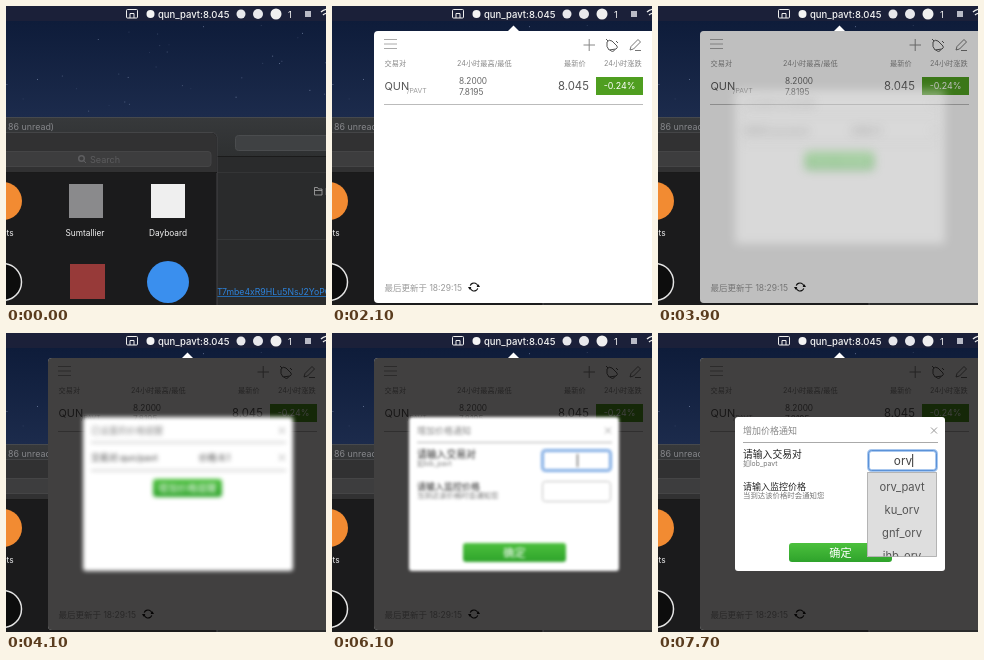
Write an HTML page with a canvas that moves like this. It is 320 px wide and 299 px high and loops after 8 s.

```html
<!DOCTYPE html>
<html lang="zh">
<head>
<meta charset="utf-8">
<title>Price alerts</title>
<style>
html, body { margin: 0; width: 100%; height: 100%; overflow: hidden; background: #1b1b1b; }
canvas { display: block; width: 320px; height: 299px; }
</style>
</head>
<body>
<canvas id="stage"></canvas>
<script>
const W = 320, H = 299, LOOP = 8000;
const canvas = document.getElementById('stage');
const ratio = window.devicePixelRatio || 1;
canvas.width = W * ratio;
canvas.height = H * ratio;
const ctx = canvas.getContext('2d');
const FONT = 'Inter, "Noto Sans CJK SC", "Noto Sans CJK", sans-serif';
const clamp = v => Math.max(0, Math.min(1, v));

function text(s, x, y, size, color, align = 'left', weight = 400) {
  ctx.font = `${weight} ${size}px ${FONT}`;
  ctx.fillStyle = color;
  ctx.textAlign = align;
  ctx.fillText(s, x, y);
}

function rect(x, y, w, h, color) {
  ctx.fillStyle = color;
  ctx.fillRect(x, y, w, h);
}

function box(x, y, w, h, r, fill, stroke, line = 1) {
  ctx.beginPath();
  ctx.roundRect(x, y, w, h, r);
  if (fill) { ctx.fillStyle = fill; ctx.fill(); }
  if (stroke) { ctx.strokeStyle = stroke; ctx.lineWidth = line; ctx.stroke(); }
}

function disc(x, y, r, fill, stroke) {
  box(x - r, y - r, 2 * r, 2 * r, r, fill, stroke, 1.5);
}

function path(d, color, width = 1, fill) {
  const p = new Path2D(d);
  if (fill) { ctx.fillStyle = fill; ctx.fill(p); }
  if (color) { ctx.strokeStyle = color; ctx.lineWidth = width; ctx.stroke(p); }
}

function gradient(y0, y1, top, bottom) {
  const g = ctx.createLinearGradient(0, y0, 0, y1);
  g.addColorStop(0, top);
  g.addColorStop(1, bottom);
  return g;
}

function sky() {
  rect(0, 0, W, 113, gradient(15, 112, '#0e1c3a', '#1c2b4c'));
  let seed = 11;
  const rnd = () => (seed = seed * 16807 % 2147483647) / 2147483647;
  rnd();
  for (let i = 0; i < 34; i++) {
    const x = rnd() * W, y = 18 + rnd() * 90, a = 0.1 + rnd() * 0.35;
    rect(x, y, 1, 1, `rgba(190,205,240,${a})`);
  }
}

function menuBar(lit) {
  rect(0, 0, W, 15, '#1b2039');
  if (lit) rect(137, 0, 89, 15, '#696c78');
  box(120.5, 3.5, 11, 8.5, 1, null, '#eee');
  path('M124 12V7.5H128V12', '#eee');
  disc(144.5, 8, 4, '#f4f4f4');
  text('qun_pavt:8.045', 152, 11.7, 9.5, '#f4f4f4', 'left', 500);
  disc(235, 8, 4.5, '#e8e8ec');
  disc(252, 8, 5, '#e8e8ec');
  disc(270, 8, 5.5, '#f0f0f0');
  text('1', 282, 11.5, 9.5, '#eee');
  rect(299, 5, 6, 6, '#b9bbc6');
  path('M315 6Q318 3 323 3M317 9Q319 7 323 7', '#eee', 1.3);
}

function mailWindow() {
  rect(0, 111, W, 188, '#2a2b2c');
  rect(0, 111, W, 40, gradient(111, 151, '#37393b', '#2e3031'));
  rect(0, 111, W, 1, '#46494d');
  text('86 unread)', 2, 123.5, 8.9, '#85868a');
  box(229.5, 129.5, 100, 15, 3, '#3f4143', '#4a4c4e');
  rect(211, 150, 109, 1, '#1b1b1b');
  rect(211, 166, 109, 1, '#343536');
  rect(211, 233, 109, 1, '#363839');
  path('M308.5 189V181.5H311.5L312.5 183H316V189ZM308.5 184.5H316', '#aaa', 0.8);
  text('I', 319, 189, 9, '#aaa');
  text('T7mbe4xR9HLu5NsJ2YoPGkd', 211, 289, 8.7, '#2d83dc');
  rect(211, 290, 109, 1, '#2469ad');
}

function label(s, x) {
  text(s, x, 230, 8.3, '#f2f2f2', 'center');
}

function launcher() {
  box(-10, 126.5, 221, 190, 5, '#1b1b1c', '#444547');
  box(-10, 127, 220.5, 40, [0, 5, 0, 0], '#313132');
  rect(0, 166, 211, 1, '#1a1a1a');
  box(-10, 145.5, 215, 15, 3, '#3d3d3e', '#454546');
  disc(75.5, 152.5, 2.8, null, '#5e5e60');
  path('M77.5 154.5L80 157', '#5e5e60');
  text('Search', 84, 156.5, 9.1, '#5c5c5e');

  disc(-3, 195, 19, '#f28b32');
  rect(63, 178, 34, 34, '#8a8a8c');
  rect(145, 178, 34, 34, '#efefef');
  disc(-3, 276, 18.5, '#0d0d0d', '#e4e4e4');
  rect(64, 258, 35, 35, '#973a39');
  disc(162, 276, 21, '#3a8fee');
  label('ts', 4);
  label('Sumtallier', 79);
  label('Dayboard', 162);
}

function refreshIcon() {
  ctx.strokeStyle = '#111';
  ctx.lineWidth = 1.2;
  for (const a of [0.35, Math.PI + 0.35]) {
    ctx.beginPath();
    ctx.arc(142, 281, 4, a, a + 2.5);
    ctx.stroke();
  }
  path('M144.6 281H148L146.4 278.2ZM136 281H139.4L137.6 283.8Z', null, 0, '#111');
}

// The popover runs past the right edge of the stage.
function popoverBox(color) {
  box(42, 25, 290, 272, 4, color);
}

function popover(dim) {
  path('M175.5 25.5L181.5 19.5L187.5 25.5Z', null, 0, '#fff');
  popoverBox('#fff');
  path('M52 33.5H65M52 38H65M52 42.5H65', '#aaa');
  path('M251.5 39H263M257.2 33V45', '#888');
  path('M275 36Q277 33 280 35L285 40Q286 42 284 43L277 44Q274 41 275 36ZM278 44Q281 47 283 43.5M274 33L276 35M284 35L286 37', '#444', 0.9);
  path('M298 44L299 40.5L306 33.5L308.5 36L301.5 43ZM303 44.5H309', '#666', 0.9);

  const head = (s, x) => text(s, x, 60, 7.2, '#888');
  head('交易对', 52.5);
  head('24小时最高/最低', 125);
  head('最新价', 232);
  head('24小时涨跌', 272);
  text('QUN', 52.5, 84, 10.9, '#555');
  text('/PAVT', 75, 87, 6.8, '#999');
  text('8.2000', 127, 78, 8.3, '#666');
  text('7.8195', 127, 88.5, 8.3, '#666');
  text('8.045', 226, 84, 11.3, '#555');
  rect(264, 71, 47, 18, '#4f9e20');
  text('-0.24%', 287.5, 83.2, 8.9, '#fff', 'center');
  rect(52, 98, 259, 1, '#bbb');
  text('最后更新于 18:29:15', 52.5, 284.5, 8.5, '#999');
  refreshIcon();
  if (dim) popoverBox(`rgba(2,1,0,${dim})`);
}

function cross(x, y) {
  path(`M${x - 3} ${y - 3}l6 6m0 -6l-6 6`, '#999');
}

function button(s, x, y, w, h, size) {
  box(x, y, w, h, 3, gradient(y, y + h, '#4cc03d', '#2ea32b'));
  text(s, x + w / 2, y + h / 2 + size * 0.36, size, '#fff', 'center');
}

function panel(title) {
  box(77, 84, 210, 154, 3, '#fff');
  text(title, 85, 101, 9, '#888');
  cross(276, 97.5);
  rect(85, 109, 195, 1, '#aaa');
}

function alertList() {
  panel('已设置的价格提醒');
  text('交易对:qun/pavt', 85, 128, 8.9, '#444');
  text('价格:8.1', 193, 128, 8.9, '#444');
  cross(276, 124.5);
  rect(85, 137, 195, 1, '#aaa');
  button('增加价格提醒', 147, 146, 69, 18, 9.8);
}

const PAIRS = ['orv_pavt', 'ku_orv', 'gnf_orv', 'jhb_orv'];

function pairMenu() {
  ctx.save();
  ctx.beginPath();
  ctx.rect(209, 139, 70, 85);
  ctx.clip();
  rect(209, 139, 70, 85, '#dedede');
  PAIRS.forEach((s, i) => text(s, 244, 158 + i * 23, 11.2, '#555', 'center'));
  ctx.restore();
  box(209.5, 139.5, 69, 84, 0, null, '#aaa', 0.8);
}

function alertForm(t) {
  const typed = 'orv'.slice(0, t < 7000 ? 0 : t < 7200 ? 1 : t < 7500 ? 2 : 3);
  panel('增加价格通知');
  text('请输入交易对', 85, 125, 9.8, '#222');
  text('如lob_pavt', 85, 132.5, 6.9, '#777');
  text('请输入监控价格', 85, 156.5, 9, '#222');
  text('当到达该价格时会通知您', 85, 165, 7.4, '#777');
  box(210.5, 117.5, 68, 20, 3, '#fff', '#a9c8ef', 3);
  box(210.5, 117.5, 68, 20, 3, null, '#5b92d8', 1);
  box(210.5, 148.5, 68, 20, 3, '#fff', '#bbb');
  button('确定', 131, 210, 103, 19, 11.2);
  text(typed, 245, 132, 11.8, '#444', 'center');
  const caret = 245 + ctx.measureText(typed).width / 2;
  if (t < 6800 || typed) rect(caret, 121, 1, 13, '#333');
  if (typed) pairMenu();
}

// Panels come into focus while fading in, and blur away when closing.
function soft(draw, alpha, blur) {
  if (alpha <= 0) return;
  ctx.save();
  ctx.globalAlpha = alpha;
  if (blur > 0.05) ctx.filter = `blur(${blur * ratio}px)`;
  draw();
  ctx.restore();
}

function appear(draw, t, start) {
  const p = clamp((t - start) / 500);
  soft(draw, clamp(p * 2), 6 * (1 - p));
}

function render(t) {
  ctx.setTransform(ratio, 0, 0, ratio, 0, 0);
  sky();
  mailWindow();
  launcher();
  menuBar(t >= 1700 && t < 2100);
  if (t >= 2000) {
    const dim = 0.75 * clamp((t - 3800) / 300);
    soft(() => popover(dim), clamp((t - 1950) / 150), 0);
  }
  if (t >= 3800 && t < 5900) {
    const out = clamp((t - 5720) / 180);
    if (out) soft(alertList, 1 - out, 5 * out);
    else appear(alertList, t, 3800);
  }
  if (t >= 5750) appear(() => alertForm(t), t, 5750);
}

const begin = performance.now();
function tick() {
  render((performance.now() - begin) % LOOP);
  requestAnimationFrame(tick);
}
tick();
</script>
</body>
</html>
```
